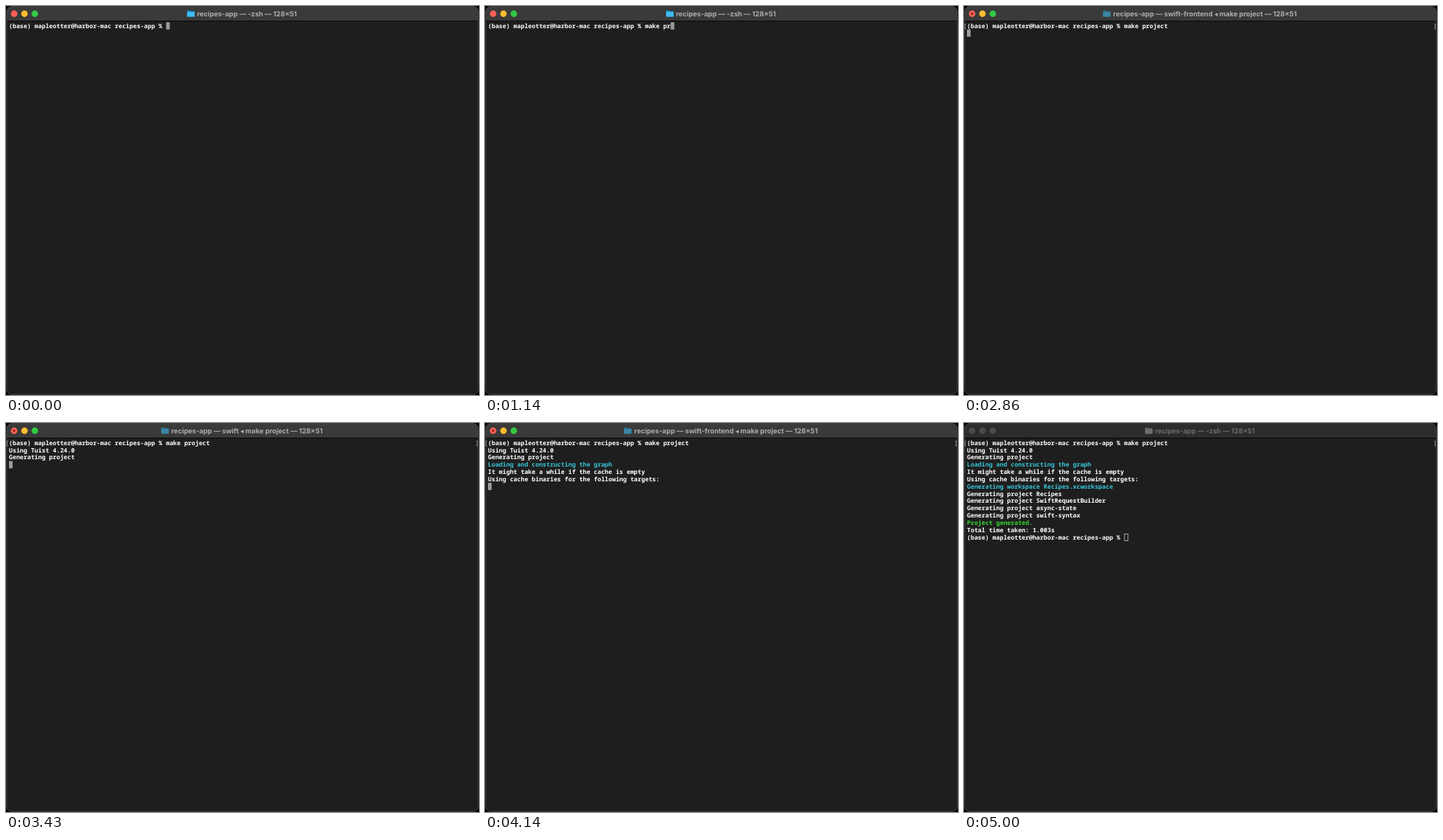
An HTML page that plays this animation: 640x527 px, repeating every 5.29 s.

```html
<!DOCTYPE html>
<html lang="en">
<head>
<meta charset="utf-8">
<title>Terminal</title>
<style>
  html, body { margin: 0; width: 100%; height: 100%; overflow: hidden; background: #000; }
  svg { display: block; width: 640px; height: 527px; }
  text { white-space: pre; text-rendering: geometricPrecision; }
  .term { font: bold 8.242px "Noto Sans Mono", "DejaVu Sans Mono", monospace; fill: #fff; }
  .title { font: bold 9.3px Inter, "DejaVu Sans", sans-serif; text-anchor: middle; }
</style>
</head>
<body>
<svg id="stage" viewBox="0 0 640 527"></svg>
<script>
const LOOP = 5290, CELL = 4.945, LINE = 9.84, LEFT = 4, TOP = 22;
const PROMPT = "(base) mapleotter@harbor-mac recipes-app % ";
const COMMAND = "make project";
const CYAN = "#35c5d6", GREEN = "#35d930";

const output = [
  ["Using Tuist 4.24.0"],
  ["Generating project"],
  ["Loading and constructing the graph", CYAN],
  ["It might take a while if the cache is empty"],
  ["Using cache binaries for the following targets:"],
  ["Generating workspace Recipes.xcworkspace", CYAN],
  ["Generating project Recipes"],
  ["Generating project SwiftRequestBuilder"],
  ["Generating project async-state"],
  ["Generating project swift-syntax"],
  ["Project generated.", GREEN],
  ["Total time taken: 1.003s"],
  [PROMPT]
];

// process name and left edge of the folder icon
const shell = ["-zsh", 245];
const swift = ["swift ◂ make project", 210];
const frontend = ["swift-frontend ◂ make project", 188];

// [start ms, typed characters, output lines (-1: still typing), title]
const steps = [
  [0, 0, -1, shell],
  [140, 1, -1, shell], [290, 2, -1, shell], [430, 3, -1, shell], [570, 4, -1, shell],
  [710, 5, -1, shell], [1000, 6, -1, shell], [1140, 7, -1, shell],
  [1860, 8, -1, shell], [2000, 9, -1, shell], [2140, 11, -1, shell], [2290, 12, -1, shell],
  [2570, 12, 0, shell], [2710, 12, 0, frontend],
  [3290, 12, 2, swift], [3570, 12, 4, swift], [3710, 12, 5, frontend],
  [4430, 12, 10, swift], [4570, 12, 13, shell], [4710, 12, 13, shell]
];

const rect = (x, y, w, h, attrs) => `<rect x="${x}" y="${y}" width="${w}" height="${h}" ${attrs}/>`;
const circle = (x, y, r, fill) => `<circle cx="${x}" cy="${y}" r="${r}" fill="${fill}"/>`;
const cell = (text, col, row, fill = "#fff") =>
  `<text class="term" x="${LEFT + col * CELL}" y="${TOP + row * LINE + 7.7}" style="fill:${fill}">${text}</text>`;

function titleBar([name, iconX], running, active) {
  const lights = active ? ["#fe5f57", "#febc2e", "#32c946"] : Array(3).fill("#4b4b4b");
  const [back, front] = !active ? ["#626262", "#6d6d6d"]
    : running ? ["#2c6f8c", "#3b87a6"] : ["#1c92d0", "#3fbdf2"];
  return `<path d="M1 20V8Q1 1 8 1H632Q639 1 639 8V20Z" fill="${active ? "#3a3a3a" : "#2c2c2c"}"/>`
    + rect(1, 19.9, 638, 1.1, 'fill="#080808"')
    + lights.map((c, i) => circle(11 + 14 * i, 10.5, 4.4, c)).join("")
    + (running ? circle(11, 10.5, 1.4, "#7a1510") : "")
    + `<path d="M${iconX} 7q0-1 1-1h2.6l1.2 1h4.4q1 0 1 1v5.5q0 1-1 1h-8.2q-1 0-1-1z" fill="${back}"/>`
    + rect(iconX, 8.3, 10.2, 6.2, `rx="0.9" fill="${front}"`)
    + `<text class="title" x="326" y="13.6" fill="${active ? "#adadad" : "#6c6c6c"}">recipes-app — ${name} — 128×51</text>`;
}

function cursor(col, row, active) {
  const x = LEFT + col * CELL, y = TOP + row * LINE;
  return active
    ? rect(x, y, CELL, LINE, 'fill="#9b9b9b"')
    : rect(x + 0.5, y + 0.5, CELL - 0.2, LINE - 0.8, 'fill="none" stroke="#b4b4b4" stroke-width="0.9"');
}

function draw([start, typed, lines, title]) {
  const active = start < 4710, entered = lines >= 0, done = lines === output.length;
  const [col, row] = done ? [PROMPT.length, lines]
    : entered ? [0, lines + 1] : [PROMPT.length + typed, 0];
  return rect(1, 1, 638, 525, 'rx="7" fill="#1e1e1e"')
    + titleBar(title, title !== shell, active)
    + rect(0.9, 0.7, 638.2, 525.6, 'rx="7" fill="none" stroke="#4c4c4c" stroke-width="0.9"')
    + cell(PROMPT + COMMAND.slice(0, typed), 0, 0)
    + (entered ? cell("[", -1, 0, "#8a8a8a") + cell("]", 127.6, 0, "#8a8a8a") : "")
    + output.slice(0, Math.max(0, lines)).map(([text, fill], i) => cell(text, 0, i + 1, fill)).join("")
    + cursor(col, row, active);
}

const stage = document.getElementById("stage");
let shown;
function tick() {
  const t = performance.now() % LOOP;
  const step = steps.findLast(s => s[0] <= t);
  if (step !== shown) stage.innerHTML = draw(shown = step);
  requestAnimationFrame(tick);
}
tick();
</script>
</body>
</html>
```
